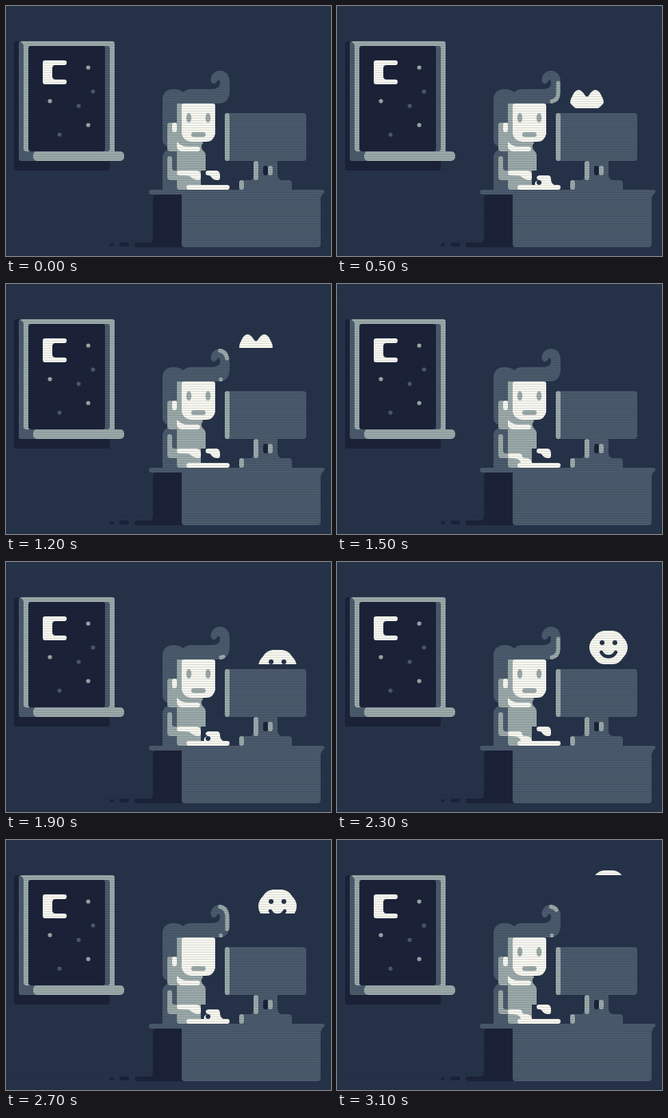
These frames come from a looping animation (407x313 px, 3200 ms). An HTML page:

```html
<!DOCTYPE html>
<html lang="en">
<head>
<meta charset="utf-8">
<title>Night typing</title>
<style>
  html, body { margin: 0; width: 100%; height: 100%; overflow: hidden; background: #263248; }
  svg { display: block; width: 100vw; height: 100vh; }
  .dark { fill: #1b2238; }
  .night { fill: #263248; }
  .mid { fill: #4a5a6b; }
  .pale { fill: #9ba9a9; }
  .white { fill: #f8f8f0; }
</style>
</head>
<body>
<svg viewBox="0 0 407 313" preserveAspectRatio="none">
  <defs>
    <pattern id="lines" width="3" height="3" patternUnits="userSpaceOnUse">
      <rect y="2" width="3" height="1" fill="#141c30" opacity=".12"/>
    </pattern>
    <clipPath id="heartClip"><rect x="280" width="100" height="128"/></clipPath>
    <clipPath id="smileClip"><rect x="280" width="100" height="128"/></clipPath>
  </defs>
  <rect class="night" width="407" height="313"/>

  <g id="window">
    <rect class="dark" x="10" y="44" width="120" height="162" rx="3"/>
    <rect class="mid" x="16" y="44" width="30" height="150" rx="3"/>
    <path class="pale" d="M20 44H133Q136 44 136 47V186H22V50Q22 47 18 45Z"/>
    <path class="mid" d="M22 180Q24 183 28 182H36V194H20Q16 194 16 190V180Z"/>
    <rect class="mid" x="118" y="50" width="12" height="132" rx="3"/>
    <rect class="dark" x="28" y="50" width="96" height="132" rx="3"/>
    <rect class="pale" x="34" y="182" width="114" height="12" rx="5"/>
    <path class="white" d="M49 68H73Q76 68 76 71T73 74H62Q58 74 58 78V88Q58 92 62 92H73Q76 92 76 95T73 98H49Q46 98 46 95V71Q46 68 49 68Z"/>
    <g id="stars"></g>
    <path id="meteor" fill="none" stroke="#9ba9a9" stroke-width="2" stroke-linecap="round"/>
  </g>

  <g id="person">
    <path class="mid" d="M196 168V115Q198 104 210 104Q217 104 222 108Q226 104 232 104H258Q268 104 268 97Q268 92 265 93Q263 98 259 97Q255 95 257 89Q260 81 268 81Q280 82 280 96V108Q279 122 266 122H226V230H196V189Q196 184 202 180V176Q196 173 196 168Z"/>
    <path id="shine" d="M269 119.5Q277 118 277 109V95Q276 85 268 83.5" fill="none" stroke="#9ba9a9" stroke-width="5" stroke-linecap="round"/>
    <path class="pale" d="M202 149Q202 146 205 146H214V122H232V170H244Q249 170 245 174Q244 179 248 182Q250 184 250 188V206H244V230H217Q214 230 214 226V182H206Q202 182 202 178Z"/>
    <rect class="white" x="208" y="146" width="6" height="12" rx="3"/>
    <path class="white" d="M223 122H259Q262 122 262 125V160Q260 170 250 170H232Q222 169 220 160V125Q220 122 223 122Z"/>
    <path class="white" d="M214 170Q220 176 227 176H240Q243 176 243 179T240 182H220Q214 181 214 176Z"/>
    <g id="eyes" class="pale">
      <ellipse cx="229" cy="140" rx="3.2" ry="6"/>
      <ellipse cx="253" cy="140" rx="3.2" ry="6"/>
    </g>
    <rect class="pale" x="232" y="158" width="18" height="6" rx="3"/>
    <path id="sleeve" class="pale"/>
    <rect class="white" x="226" y="224" width="54" height="6" rx="3"/>
    <path id="leftArm" class="white"/>
    <path id="rightHand" class="white"/>
    <circle id="gap" class="night" cx="253" cy="221" r="3"/>
  </g>

  <g id="desk">
    <path class="dark" d="M187 236H222V302H164Q161 302 161 299T164 296H180Q184 296 184 290V239Z"/>
    <rect class="dark" x="142" y="296" width="12" height="5" rx="2.5"/>
    <rect class="dark" x="130" y="297" width="5" height="4" rx="2"/>
    <path class="mid" d="M182 230H396Q399 230 399 233Q394 237 394 242V298Q394 302 390 302H224Q220 302 220 298V236H182Q179 236 179 233T182 230Z"/>
    <rect class="mid" x="274" y="134" width="102" height="60" rx="4"/>
    <rect class="pale" x="274" y="134" width="6" height="60" rx="3"/>
    <path class="mid" d="M313 194H340V212Q341 218 346 218H354Q358 218 358 222V230H292V222Q292 218 296 218H306Q310 218 310 212V197Z"/>
    <rect class="pale" x="310" y="194" width="6" height="24" rx="3"/>
    <rect class="pale" x="292" y="218" width="6" height="12" rx="3"/>
    <rect class="dark" x="322" y="200" width="6" height="12" rx="3"/>
    <rect class="pale" x="328" y="200" width="6" height="12" rx="3"/>
  </g>

  <g clip-path="url(#heartClip)">
    <path id="heart" class="white" d="M303 0Q307 1 310 6Q313 11 316 6Q319 1 323 0Q328 0 331 7Q334 12 334 16Q332 20 324 25L317 31Q313 35 309 31L302 25Q294 20 292 16Q292 12 295 7Q298 0 303 0Z"/>
  </g>
  <g clip-path="url(#smileClip)">
    <g id="smile">
      <path class="white" d="M334 0H346Q354 1 358 8Q364 14 364 21T358 34Q354 41 346 42H334Q326 41 322 34Q316 28 316 21T322 8Q326 1 334 0Z"/>
      <circle class="night" cx="332" cy="15" r="3"/>
      <circle class="night" cx="348" cy="15" r="3"/>
      <path d="M331 27Q334 32.500 340 32.500T349 27" fill="none" stroke="#263248" stroke-width="4.500" stroke-linecap="round"/>
    </g>
  </g>
  <rect width="407" height="313" fill="url(#lines)"/>
</svg>
<script>
const $ = id => document.getElementById(id);
const set = (el, attrs) => { for (const k in attrs) el.setAttribute(k, attrs[k]); };
const STEP = 100, STEPS = 32, UNIT = 6;

// Alternating pale and dim stars
[[103, 77], [109, 107], [55, 119], [91, 125], [103, 149], [67, 161]].forEach(([x, y], i) => {
  const star = document.createElementNS("http://www.w3.org/2000/svg", "circle");
  set(star, { cx: x, cy: y, r: 2.6, class: i % 2 ? "mid" : "pale" });
  $("stars").append(star);
});

// Bit 1: left arm down, bit 2: right hand down
const TYPING = [0, 1, 3, 2, 0, 2, 3, 1];
const SLEEVE = [
  "M205 188Q208 188 208 191V203Q208 206 211 206H216V218H206Q202 218 202 214V191Q202 188 205 188Z",
  "M205 188Q208 188 208 191V208Q208 212 211 212H216V218H206Q202 218 202 214V191Q202 188 205 188Z"
];
const ARM = [
  "M217 206H239Q244 207 244 212V215Q244 218 240 218Q234 217 230 213Q228 212 217 212Q214 212 214 209T217 206Z",
  "M217 212H227Q232 212 232 216Q232 218 238 218Q244 219 244 224V228H229Q232 222 226 219Q222 218 217 218Q214 218 214 215T217 212Z"
];
const HAND = [
  "M253 206H264Q268 207 268 212V215Q268 218 265 218Q259 218 257 214Q256 212 253 212Q250 212 250 209T253 206Z",
  "M253 212H264Q268 212 268 217Q268 222 272 224V227H248V221Q250 218 253 218Q250 217 250 215T253 212Z"
];

// Rises one unit per step; the lower edge is wiped away twice as fast
function rise(id, top, end, n) {
  const edge = Math.min(128, end - 2 * UNIT * n);
  $(id).setAttribute("transform", `translate(0 ${top - UNIT * n})`);
  $(id + "Clip").firstElementChild.setAttribute("height", Math.max(0, edge));
}

const curl = $("shine").getTotalLength();
function shine(n) {
  const head = Math.min(curl, 3 + UNIT * n), tail = Math.max(0, (n - 6) * UNIT);
  const on = n >= 0 && n < 13 && tail < head;
  set($("shine"), {
    visibility: on ? "visible" : "hidden",
    "stroke-dasharray": `0 ${tail} ${Math.max(.1, head - tail)} 200`
  });
}

function draw(time) {
  const n = Math.floor(time / STEP) % STEPS;
  const pose = TYPING[n % 8], left = pose & 1, right = pose >> 1;
  $("sleeve").setAttribute("d", SLEEVE[left]);
  $("leftArm").setAttribute("d", ARM[left]);
  $("rightHand").setAttribute("d", HAND[right]);
  $("gap").setAttribute("visibility", right ? "visible" : "hidden");
  $("eyes").setAttribute("visibility", n === 27 ? "hidden" : "visible");

  rise("heart", 135, 224, n);
  rise("smile", 224, 416, n);
  shine(n < 19 ? n - 1 : n - 19);

  const m = n - 13, x = 108 - 24 * m;
  set($("meteor"), {
    d: `M${x} ${88 + 16 * m}l-12 8`,
    visibility: m === 0 || m === 1 ? "visible" : "hidden"
  });
}

const start = performance.now();
function tick() {
  draw(performance.now() - start);
  requestAnimationFrame(tick);
}
tick();
</script>
</body>
</html>
```
